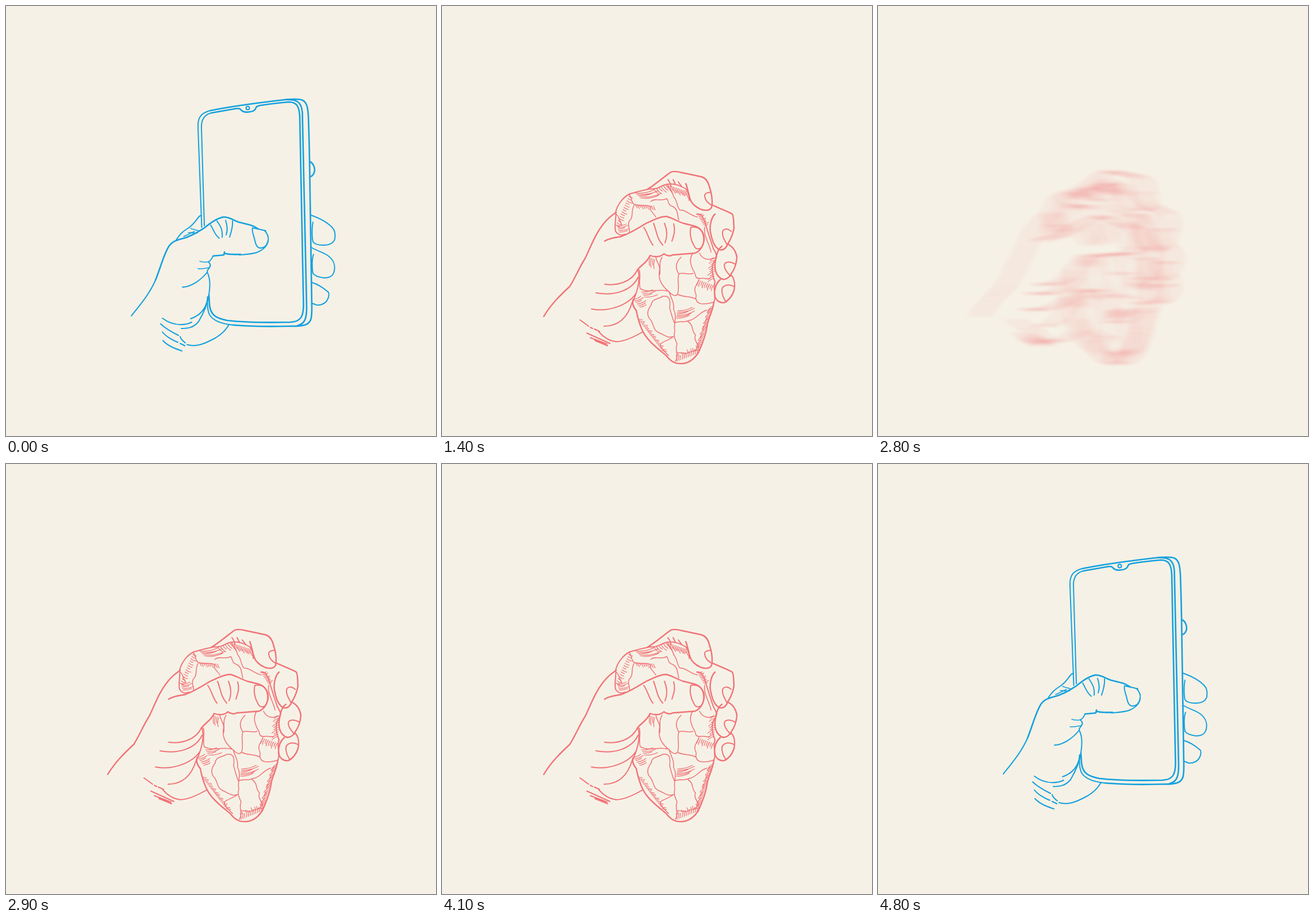
These frames come from a looping animation (748 by 748 pixels, 5.3 s). An HTML page:

```html
<!DOCTYPE html>
<html lang="en">
<head>
<meta charset="utf-8">
<title>Hand, phone and stone</title>
<style>
html, body { margin: 0; width: 100%; height: 100%; overflow: hidden; background: #f6f1e6; }
svg { display: block; width: 100%; height: 100%; }
path, circle { fill: none; stroke-linecap: round; stroke-linejoin: round; }
#phone { stroke: #14a1de; stroke-width: 2.6; }
#stone { stroke: #f07377; stroke-width: 2.4; }
.mid { stroke-width: 2; }
.thin { stroke-width: 1.5; }
.hair { stroke-width: 1.25; }
.view { opacity: 0; animation: 5300ms step-end infinite; }
.phone { animation-name: phone; }
.phone-blur { animation-name: phone-blur; }
.stone { animation-name: stone; }
.stone-blur { animation-name: stone-blur; }
@keyframes phone {
  0%, 28.301%, 58.49%, 90.565% { opacity: 1; }
  24.528%, 52.83%, 77.358% { opacity: 0; }
  100% { opacity: 1; }
}
@keyframes phone-blur {
  0%, 26.415%, 100% { opacity: 0; }
  24.528% { opacity: 1; }
}
@keyframes stone {
  0%, 28.301%, 56.603%, 86.792%, 90.565%, 100% { opacity: 0; }
  26.415%, 54.716%, 77.358%, 88.679% { opacity: 1; }
}
@keyframes stone-blur {
  0%, 54.716%, 58.49%, 88.679%, 100% { opacity: 0; }
  52.83%, 56.603%, 86.792% { opacity: 1; }
}
</style>
</head>
<body>
<svg viewBox="0 0 748 748">
<defs>
  <filter id="smear" filterUnits="userSpaceOnUse" x="0" y="0" width="748" height="748" color-interpolation-filters="sRGB">
    <feConvolveMatrix data-span="41" edgeMode="none"/>
  </filter>
  <filter id="haze" filterUnits="userSpaceOnUse" x="0" y="0" width="748" height="748" color-interpolation-filters="sRGB">
    <feConvolveMatrix data-span="45" edgeMode="none"/>
    <feGaussianBlur stdDeviation="3.5 2.2"/>
  </filter>

  <g id="phone">
    <!-- case -->
    <path class="mid" d="M340.5 385L334 212C333 193 340 186 355 182"/>
    <path d="M355 182C400 173 450 167 485 163C500 161.500 510 161 516 164C524 168 525 178 526 192C527 220 528 260 528.500 300L532 525C532 543 531 550 522 554C515 557 505 557 490 557C450 558 420 557 395 555"/>
    <path class="mid" d="M395 555C375 553 360 547 354 537C350 529 350 518 350.500 506"/>
    <path d="M486 163C505 162 514 166 515.500 185L523 525C523 543 520 553 507 556"/>
    <!-- screen -->
    <path class="mid" d="M345 382L340 212C339.500 197 345 189 357 186"/>
    <path d="M357 186L400 178.500C406 177.500 407 179 409 181C412 184 415 185 421 184.500C428 184 432 183 434 179C435 175 437 174 442 173C460 170 480 168 492 167C506 167 510 175 511 192L517.500 520C517.500 540 513 549 495 550C450 551 410 550 385 547C365 543 356 538 354 520L353 503"/>
    <circle class="mid" cx="420.500" cy="177.500" r="3"/>
    <!-- fingers -->
    <path d="M529 271C534 273 537 280 537 286C536 292 533 296 529 297"/>
    <path class="mid" d="M531 364C545 369 560 377 568 386C573 391 573 398 572 405C570 412 563 416 552 416C543 416 537 415 534 410C532 402 532 385 534 376"/>
    <path class="mid" d="M531 420C543 427 552 428 561 435C571 443 573 451 571 461C569 470 563 473 553 473C546 472 537 470 534 465C532 455 532 440 535 432"/>
    <path class="mid" d="M532 481C543 484 553 491 561 498C563 503 561 508 558 513C553 519 548 521 540 520L532 517"/>
    <!-- thumb and wrist -->
    <path d="M260 477C270 452 275 430 284 417C290 409 296 408 302 406C320 402 332 394 345 386C355 378 365 370 378 367C390 367 395 373 405 376L425 381C432 383 436 386 439 388"/>
    <path class="mid" d="M218 539C235 518 250 500 260 477"/>
    <path class="mid" d="M296 407C303 396 308 392 316 387C326 381 330 373 336 366L340 364"/>
    <path class="thin" d="M309 401L328 392M317 394L333 395M321 387L335 391"/>
    <path class="mid" d="M452 391C445 389 438 388 429 386C427 390 430 397 432 404C434 414 436 421 443 421C450 421 454 417 456 408"/>
    <path class="mid" d="M450 391C455 396 457 402 456 408C455 417 447 424 438 428C428 432 415 432 406 433"/>
    <path d="M408 432C397 432 388 433 380 430V428L379 433C372 434 365 434 360 435"/>
    <path class="mid" d="M360 435C358 440 356 443 352 445C354 448 357 449 355 453C353 457 350 459 350 462"/>
    <path class="thin" d="M337 444C343 446 347 446 352 445M334 457C342 458 348 456 354 455"/>
    <path class="mid" d="M356 381C361 389 363 398 371 404M367 374C374 384 377 390 376 402M382 373C385 382 386 390 383 398M394 374C395 384 392 392 389 402"/>
    <path class="mid" d="M307 489C322 489 340 476 350 463C356 475 355 488 353 502C351 517 345 532 335 549C326 560 316 561 305 561"/>
    <path class="mid" d="M321 544C336 539 348 528 351 508M272 543C285 553 300 556 315 553C319 552 321 551 323 550"/>
    <path class="mid" d="M269 553C278 562 290 568 300 573M272 567C278 575 291 582 299 585M273 582C282 592 295 596 306 600M303 575C304 580 308 583 312 586M303 587L311 591M315 589C330 594 345 588 365 577C375 571 383 563 388 554"/>
  </g>

  <g id="stone">
    <!-- wrist and palm -->
    <path d="M177 540C190 518 207 502 222 488C232 473 238 456 249 439C260 416 266 398 280 380C287 371 295 364 303 359"/>
    <path class="mid" d="M283 484C305 487 330 480 340 459M268 499C300 505 330 495 341 472M260 527C290 533 325 520 338 499M282 557C305 557 322 545 331 515M341 459C347 480 336 505 331 517"/>
    <path class="mid" d="M240 546L255 557M258 559L262 561M265 562L274 566M273 567C282 577 292 583 303 584C318 584 335 575 349 567M252 569L292 587M258 577L287 588M266 582L288 591"/>
    <!-- fingers -->
    <path d="M357 319C372 310 385 298 398 289C402 287 410 288 418 290L451 297C459 299 463 306 465 314C469 326 471 340 469 350C466 356 458 356 451 354C441 350 434 343 432 337C428 325 427 315 424 309"/>
    <path class="mid" d="M468 324C462 324 456 326 457 331C458 338 463 343 468 346M393 302C396 306 398 309 398 314M402 302L406 310M411 306L417 314"/>
    <path d="M470 346C482 352 497 357 505 362C508 367 507 378 508 386C506 397 503 405 497 414C495 420 490 426 483 424C474 420 470 408 468 398C464 386 468 368 475 362"/>
    <path class="mid" d="M503 392C495 385 487 388 488 396C488 404 494 410 496 416"/>
    <path d="M497 414C505 418 511 425 513 437C512 450 509 458 503 466C500 472 494 477 487 475C478 470 474 460 475 448C476 435 480 422 487 418"/>
    <path class="mid" d="M510 449C502 444 492 444 491 451C491 459 498 466 502 470"/>
    <path d="M503 468C509 474 510 485 508 495C505 504 499 512 491 516C483 517 475 512 474 501C474 490 478 481 484 476"/>
    <path class="mid" d="M508 488C500 483 490 485 487 492C486 501 490 508 494 515"/>
    <!-- thumb -->
    <path d="M283 409C292 403 302 403 312 401C330 394 342 386 355 378C367 373 378 366 390 366C402 369 410 375 420 378L440 383C449 386 456 394 456 404C456 415 450 426 440 430L401 433C397 436 390 434 386 431C380 437 370 437 362 434C358 445 345 452 340 459"/>
    <path class="mid" d="M433 385C430 395 433 408 438 416C441 425 450 424 453 417C457 408 456 396 449 388C443 384 438 384 433 385M351 385C358 395 360 408 367 416M368 378C373 390 374 406 384 416M387 378C392 390 392 402 388 412M403 379C407 392 402 402 400 409"/>
    <!-- rock edge -->
    <path class="mid" d="M318 397C312 400 306 398 302 392C299 380 304 368 302 359C305 345 315 333 326 327C340 323 352 320 362 318C375 320 380 312 392 310C405 308 415 313 424 318C430 325 430 332 430 338"/>
    <path d="M473 515C470 535 462 545 461 558C458 575 452 590 446 603C440 612 432 621 418 622C404 623 397 617 390 608C378 598 364 588 355 575C345 562 341 545 338 530C332 522 330 515 333 510"/>
    <path class="mid" d="M443 362C450 360 455 368 458 378C462 392 468 410 472 422C478 432 480 437 474 443C467 455 470 468 475 480C470 492 478 504 473 515"/>
    <!-- facets -->
    <path class="thin" d="M326 328C331 334 328 340 334 345C345 350 354 344 363 349C360 356 368 360 372 367M363 340C372 333 380 341 391 335C395 340 392 346 402 349C411 354 409 364 412 372M392 311C396 320 402 324 403 332C410 339 408 349 414 355M414 355C424 354 431 364 444 367M334 347C328 358 334 366 326 374C321 382 328 386 326 394M303 362C309 366 307 374 313 380"/>
    <path class="thin" d="M372 437C374 448 381 452 378 463C376 478 386 490 395 497M383 437C377 445 380 455 379 467M416 437C405 447 406 457 412 466C408 478 414 486 410 501C406 507 399 502 395 497M436 430C429 442 433 451 437 460C444 467 437 474 449 474C456 472 459 476 466 474M412 466C421 463 427 468 437 465M448 430C453 441 464 443 473 438M457 385C454 398 466 416 468 428M343 459C347 469 341 480 345 492C360 500 378 491 392 496"/>
    <path class="thin" d="M364 520C365 509 374 511 384 505C395 503 398 510 396 525C400 540 403 550 405 552M364 520C354 533 358 541 363 546C370 556 366 564 379 569C390 574 392 578 403 575M395 497C399 510 404 515 403 528C410 541 402 552 405 565C402 575 406 580 409 588C404 599 413 607 406 618M403 575C393 583 386 582 380 588C378 594 387 600 394 608M411 502C421 507 431 504 442 510C444 520 456 520 473 515M405 551C414 547 420 552 430 547C442 546 449 531 461 529M428 549C439 556 433 565 441 572C437 582 446 585 447 599C438 598 431 602 424 605C417 601 413 606 408 602M447 476C443 487 437 489 441 499C444 505 440 508 442 510"/>
    <path class="hair" id="hatch"/>
  </g>
</defs>
<use class="view phone" href="#phone"/>
<g class="view phone-blur"><use href="#phone" filter="url(#smear)"/></g>
<use class="view stone" href="#stone"/>
<g class="view stone-blur"><use href="#stone" filter="url(#haze)"/></g>
</svg>
<script>
// Even horizontal blur kernels
for (const el of document.querySelectorAll('[data-span]')) {
  const n = +el.dataset.span;
  el.setAttribute('order', n + ' 1');
  el.setAttribute('kernelMatrix', Array(n).fill(1).join(' '));
}

// Rows of short bent strokes: start, end, count, stroke vector
const rows = [
  [303, 381, 325, 331, 14, 8, 4],
  [305, 382, 308, 393, 5, 18, -3],
  [336, 325, 346, 334, 5, 38, -6],
  [369, 319, 390, 312, 6, 9, 9],
  [394, 312, 427, 323, 13, 4, 11],
  [337, 345, 368, 348, 10, 3, 7],
  [445, 364, 456, 382, 8, 9, -3],
  [362, 438, 370, 441, 4, -1, 16],
  [476, 438, 473, 474, 10, -11, 6],
  [447, 477, 472, 486, 9, -4, 10],
  [333, 510, 344, 524, 6, 15, -6],
  [347, 497, 352, 506, 4, 23, -4],
  [410, 530, 408, 543, 6, 30, -7],
  [341, 544, 383, 599, 18, 9, 2],
  [471, 522, 449, 592, 20, -9, 8],
  [409, 618, 444, 604, 12, -2, -12]
];
let d = '';
for (const [x1, y1, x2, y2, n, dx, dy] of rows) {
  for (let i = 0; i < n; i++) {
    const t = i / (n - 1), k = 0.85 + 0.2 * Math.sin(i * 2.4);
    const x = x1 + (x2 - x1) * t, y = y1 + (y2 - y1) * t;
    const bx = dx * k, by = dy * k;
    d += `M${x} ${y}q${bx / 2 - by * 0.15} ${by / 2 + bx * 0.15} ${bx} ${by}`;
  }
}
document.getElementById('hatch').setAttribute('d', d);
</script>
</body>
</html>
```
